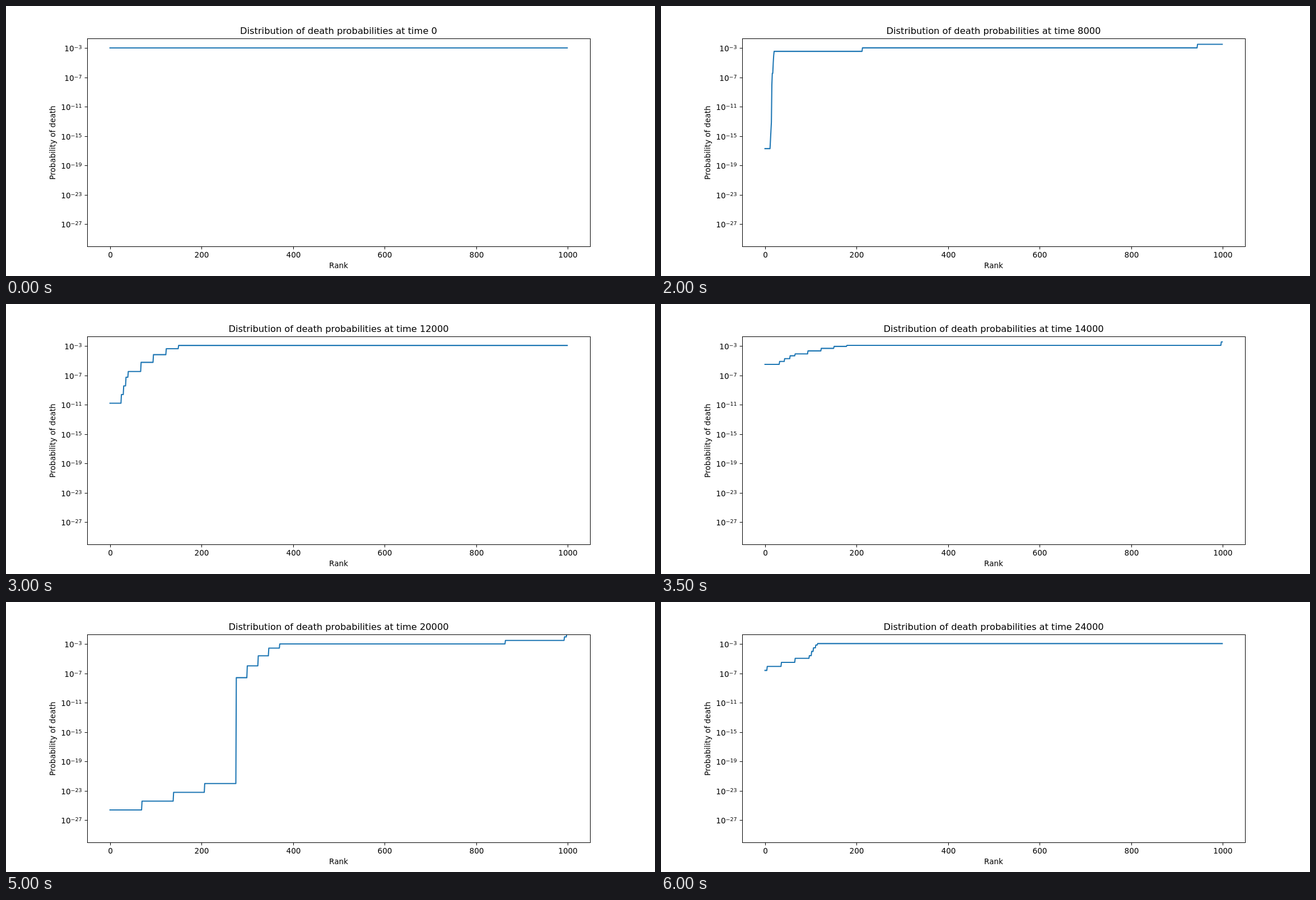
Animation of 1159 by 483 pixels, one loop 6.5 s. Source, as an HTML page with a canvas:

```html
<!DOCTYPE html>
<html lang="en">
<head>
<meta charset="utf-8">
<title>Distribution of death probabilities</title>
<style>
  html, body { margin: 0; width: 100%; height: 100%; overflow: hidden; background: #fff; }
  canvas { display: block; }
</style>
</head>
<body>
<canvas id="plot" width="1159" height="483"></canvas>
<script>
const ctx = document.getElementById('plot').getContext('2d');
const HOLD = 500;
const RANKS = 1000;
const TEXT = 13.55;
const TITLE = 16.25;
const box = { left: 145, right: 1043, top: 58, bottom: 430 };
const rankX = r => 185.7 + r * 0.8174;
const decadeY = e => 429.87 - (e + 30) * 13.141;

// Lowest exponent, ranks where the climb and the cliff start, then the start of each plateau
const keys = [
  [-3, 0, 0, 0],
  [-26.4, 15, 15, 180],
  [-16.5, 148, 148, 287],
  [-16.5, 40, 40, 190],
  [-16.7, 12, 15, 20, 213, 945],
  [-17.2, 86, 101, 122, 597],
  [-10.8, 25, 40, 150],
  [-5.5, 32, 66, 179, 997],
  [-6.9, 30, 60, 160],
  [-31, 40, 130, 300, 900],
  [-25.6, 70, 276, 371, 864, 993, 998],
  [-7.1, 10, 90, 150],
  [-6.6, 5, 97, 115]
];

// Each plateau is three times as likely as the one before, and all of them add up to 1
function plateauBase(plateaus) {
  const total = plateaus.reduce((sum, from, i) =>
    sum + 3 ** i * ((plateaus[i + 1] ?? RANKS) - from), 0);
  return -Math.log10(total);
}

function staircase([low, climb, cliff, ...plateaus]) {
  const levels = new Array(RANKS).fill(low);
  const setFrom = (rank, exponent) => levels.fill(exponent, Math.round(rank));
  const base = plateauBase(plateaus);
  const gap = base - low;

  const rise = Math.min(1.2, gap * 0.15);
  for (let i = 0; i < 3; i++) {
    setFrom(climb + (cliff - climb) * i / 3, low + rise * (i + 1));
  }
  const drop = Math.min(4.6, gap * 0.45);
  for (let u = 0; u < 1; u += 0.25) {
    setFrom(cliff + (plateaus[0] - cliff) * u, base - drop * (1 - u) ** 1.5);
  }
  plateaus.forEach((from, i) => setFrom(from, base + i * Math.log10(3)));
  return levels;
}

const curves = keys.map(staircase);

function label(text, x, y, size = TEXT, align = 'center') {
  ctx.font = `${size}px "DejaVu Sans", sans-serif`;
  ctx.textAlign = align;
  ctx.fillText(text, x, y);
  return ctx.measureText(text).width;
}

function line(x1, y1, x2, y2) {
  ctx.beginPath();
  ctx.moveTo(x1, y1);
  ctx.lineTo(x2, y2);
  ctx.stroke();
}

function drawCurve(levels) {
  ctx.save();
  ctx.beginPath();
  ctx.rect(box.left, box.top, box.right - box.left, box.bottom - box.top);
  ctx.clip();
  ctx.strokeStyle = '#1f77b4';
  ctx.lineWidth = 2.08;
  ctx.lineCap = 'square';
  ctx.lineJoin = 'round';
  ctx.beginPath();
  levels.forEach((e, r) => ctx.lineTo(rankX(r), decadeY(e)));
  ctx.stroke();
  ctx.restore();
}

function drawAxes() {
  ctx.fillStyle = ctx.strokeStyle = '#000';
  ctx.lineWidth = 1;
  ctx.strokeRect(box.left + 0.5, box.top + 0.5, box.right - box.left, box.bottom - box.top);

  for (let r = 0; r <= RANKS; r += 200) {
    const x = Math.round(rankX(r)) + 0.5;
    line(x, box.bottom + 0.5, x, box.bottom + 5.4);
    label(r, x, 450);
  }
  for (let e = -3; e >= -27; e -= 4) {
    const y = Math.round(decadeY(e));
    line(box.left - 4.4, y + 0.5, box.left + 0.5, y + 0.5);
    const w = label('\u2212' + -e, 135.5, y + 2, TEXT * 0.7, 'right');
    label('10', 135.5 - w, y + 6, TEXT, 'right');
  }

  label('Rank', 594, 469);
  ctx.save();
  ctx.translate(88, 244.5);
  ctx.rotate(-Math.PI / 2);
  label('Probability of death', 0, 0);
  ctx.restore();
}

function draw(ms) {
  const i = Math.floor(ms / HOLD) % curves.length;
  ctx.fillStyle = '#fff';
  ctx.fillRect(0, 0, 1159, 483);
  drawCurve(curves[i]);
  drawAxes();
  label(`Distribution of death probabilities at time ${i * 2000}`, 594, 50, TITLE);
}

const start = performance.now();
function tick() {
  draw(performance.now() - start);
  requestAnimationFrame(tick);
}
tick();
</script>
</body>
</html>
```
